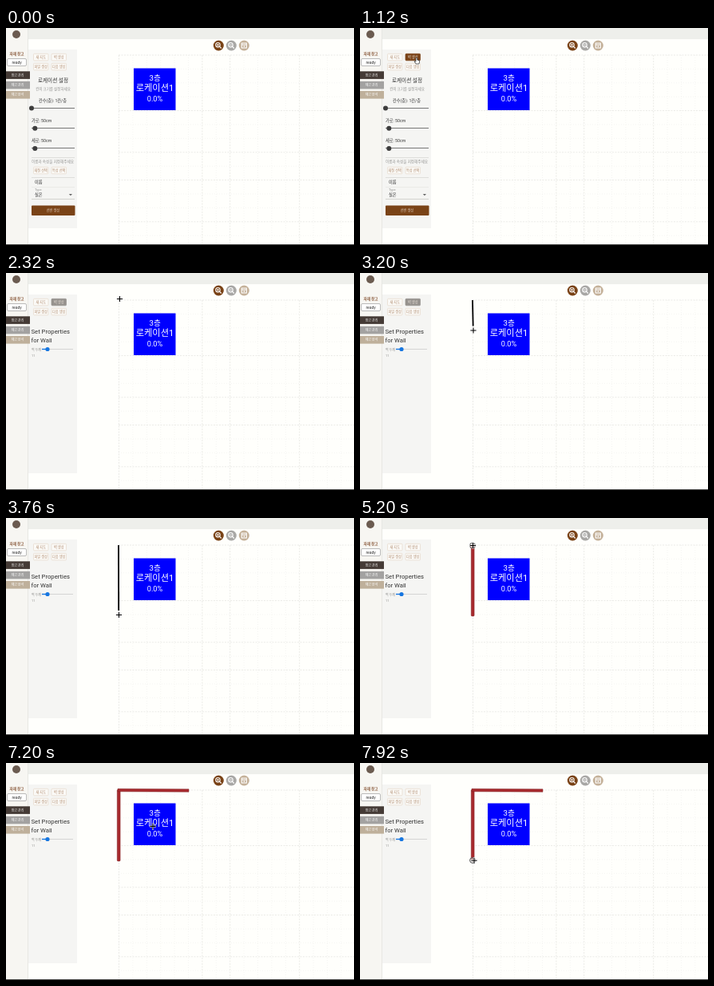
Write an HTML page that moves like this. It is 436 px wide and 272 px high and loops after 8000 ms.

```html
<!DOCTYPE html>
<html lang="ko">
<head>
<meta charset="utf-8">
<style>
html, body { margin: 0; width: 100%; height: 100%; overflow: hidden; background: #fffffc; }
svg { display: block; width: 436px; height: 272px; }
text { font-family: Roboto, "Noto Sans CJK KR", "Noto Sans CJK", sans-serif; fill: #333; }
.mid { text-anchor: middle; }
.pale { fill: #929290; }
.track { stroke: #777; stroke-width: 1; }
.knob { fill: #3d3d3d; }
.icon { fill: none; stroke: #fff; stroke-width: 1.1; }
.btn rect { fill: #fbfaf7; stroke: #e6d8ca; stroke-width: .7; }
.btn text { fill: #b08c70; font-size: 4.2px; text-anchor: middle; }
.hover rect { fill: #7a4317; stroke: #7a4317; }
.focus rect { fill: #96928e; stroke: #96928e; }
.hover text, .focus text { fill: #e8e0d8; }
.label text { fill: #fff; }
</style>
</head>
<body>
<svg viewBox="0 0 436 272">
  <rect width="436" height="272" fill="#fffffc"/>
  <rect x="28" width="408" height="14" fill="#eeefeb"/>
  <g id="grid" fill="none"></g>

  <rect width="27.5" height="272" fill="#f7f6f2"/>
  <path d="M27.5 0V272" stroke="#dededa" stroke-width=".7"/>
  <circle cx="13" cy="8" r="5" fill="#6b5b50"/>
  <text class="mid" x="13.5" y="33.5" font-size="4.6" font-weight="700" style="fill:#8a5a3c">자재 창고</text>
  <rect x="1.5" y="38.5" width="24" height="9" rx="1.5" fill="#fff" stroke="#aaa" stroke-width=".8"/>
  <text class="mid" x="13.5" y="44.7" font-size="5">ready</text>

  <rect x="28" y="27" width="61" height="224" fill="#f5f5f3"/>
  <g id="menu"></g>
  <g id="buttons"></g>

  <g id="shelfPanel">
    <text class="mid" x="59" y="68.3" font-size="6.6">로케이션 설정</text>
    <text class="mid pale" x="59" y="78.3" font-size="4.5">칸의 크기를 설정하세요</text>
    <text class="mid" x="58.5" y="92.8" font-size="5.2">칸수(층): 1칸/층</text>
    <text x="32" y="117.8" font-size="5.2">가로: 50cm</text>
    <text x="32" y="143" font-size="5.2">세로: 50cm</text>
    <path class="track" d="M32 100.5H86M32 125.5H86M32 150.5H86"/>
    <circle class="knob" cx="32" cy="100.5" r="3"/>
    <circle class="knob" cx="36.3" cy="125.8" r="3"/>
    <circle class="knob" cx="36.3" cy="151" r="3"/>
    <path d="M32 162.5H86M32 187.5H86" stroke="#d9d9d6" stroke-width=".8"/>
    <text class="pale" x="32" y="169.3" font-size="4.6">이름과 속성을 지정해주세요</text>
    <text x="36" y="194.6" font-size="5.2">이름</text>
    <path d="M32 199.5H86" stroke="#e6e6e3" stroke-width=".7"/>
    <text class="pale" x="36" y="204.3" font-size="4">Type</text>
    <text x="36" y="211" font-size="5.2">실온</text>
    <path d="M78.8 208H83L80.9 210.2Z" fill="#666"/>
    <path d="M32 214.5H86" stroke="#c4c4c1" stroke-width=".7"/>
    <rect x="32" y="222.5" width="54.5" height="12.5" rx="1" fill="#7a4317"/>
    <text class="mid" x="59" y="230.3" font-size="4.2" style="fill:#e2d0c0">선반 생성</text>
  </g>

  <g id="wallPanel">
    <text x="31.5" y="75.6" font-size="7.7">Set Properties</text>
    <text x="31.5" y="86.5" font-size="7.7">for Wall</text>
    <text class="pale" x="32" y="97.8" font-size="4">벽 두께</text>
    <path d="M45 95.5H84" stroke="#d4d4d4" stroke-width="1.2"/>
    <path d="M45 95.5H52" stroke="#1676e0" stroke-width="1.4"/>
    <circle cx="52" cy="95.5" r="2.6" fill="#1676e0"/>
    <text class="pale" x="32" y="105" font-size="4">11</text>
  </g>

  <circle cx="266.3" cy="22" r="6.5" fill="#7a4317"/>
  <circle cx="282.3" cy="22" r="6.5" fill="#a9a8a6"/>
  <circle cx="298.3" cy="22" r="6.5" fill="#c4b199"/>
  <g class="icon">
    <path d="M267.4 23.1L269.8 25.5M264.3 21.2h2.4M265.5 20v2.4"/><circle cx="265.5" cy="21.2" r="2.7"/>
    <path d="M283.4 23.1L285.8 25.5M280.3 21.2h2.4"/><circle cx="281.5" cy="21.2" r="2.7"/>
    <path d="M295.3 19h6v6h-6zM295.3 21h6M298.3 22v2"/>
  </g>

  <rect x="160" y="50.5" width="52.5" height="52.5" fill="#00f"/>
  <g class="mid label">
    <text x="186.7" y="66" font-size="9.6">3층</text>
    <text x="186.5" y="79.3" font-size="11.2">로케이션1</text>
    <text x="186.5" y="92.2" font-size="9.2">0.0%</text>
  </g>

  <g fill="#a82a2e" stroke="#7d2023" stroke-width=".5">
    <rect id="wallA" x="139.3" y="33.5" width="3.8" height="89.5" rx="1"/>
    <path id="wallB" d="M140 32.3L229 32.8V36.2L140 35.8Z"/>
  </g>
  <path id="draft" stroke="#000" stroke-width="1.8"/>
  <circle id="snap" r="3.4" fill="#ddd" fill-opacity=".6" stroke="#555" stroke-width="1"/>
  <g id="cross" fill="none">
    <path d="M-4 0H4M0-4V4" stroke="#fff" stroke-width="2"/>
    <path d="M-3.6 0H3.6M0-3.6V3.6" stroke="#000" stroke-width="1.1"/>
  </g>
  <path id="hand" d="M-1-3.5Q0-4.3.8-3.5V-1L3.4-.3Q4 2 2.8 4H-.8L-3 .8L-1 1Z" fill="#fff" stroke="#222" stroke-width=".7"/>
  <path d="M0 271.5H436" stroke="#4a4a48"/>
</svg>
<script>
const $ = id => document.getElementById(id);
const LOOP = 8000, ORIGIN = { x: 141.5, y: 34 };

function buildGrid() {
  const step = 17.4;
  let out = "";
  const line = (d, strong) => {
    const look = strong ? 'stroke="#dcdcd8" stroke-dasharray="2 1.5"' : 'stroke="#efefeb" stroke-dasharray="1 2"';
    out += `<path d="${d}" stroke-width=".6" ${look}/>`;
  };
  for (let k = 0; k < 17; k++) line(`M${ORIGIN.x + k * step} 34V271`, [0, 6, 8, 13].includes(k));
  for (let k = 0; k < 14; k++) line(`M141 ${ORIGIN.y + k * step}H436`, [0, 4, 7, 9, 12].includes(k));
  $("grid").innerHTML = out;
}

const button = (x, y, label, id = "") =>
  `<g class="btn" id="${id}"><rect x="${x}" y="${y}" width="18.5" height="8.5" rx="1"/>` +
  `<text x="${x + 9.2}" y="${y + 5.8}">${label}</text></g>`;

buildGrid();
$("menu").innerHTML = [["#453b36", "창고 관리", 54.3], ["#a3a2a1", "재고 관리", 66.8], ["#bfb09b", "재고 분석", 79]]
  .map(([color, label, y]) => `<rect y="${y}" width="30" height="9.6" fill="${color}"/>` +
    `<text class="mid" x="14.5" y="${y + 6.3}" font-size="4" style="fill:#fff">${label}</text>`).join("");
$("buttons").innerHTML = button(34.5, 32.3, "새 지도") + button(57, 32.3, "벽 생성", "wallButton") +
  button(34.5, 44.3, "파일 생성") + button(57, 44.3, "다음 생성");
$("shelfPanel").innerHTML += button(34.5, 174.3, "재질 선택") + button(57, 174.3, "특성 선택");

// Pointer path: time, x, y
const path = [
  [160, 66, 222], [560, 66, 166], [960, 71, 41], [1440, 71, 41], [1760, 142, 33], [2320, 142.5, 32.5],
  [2800, 141, 33], [3040, 142, 34], [3360, 142, 110], [3760, 141.5, 121.5], [4240, 141.5, 121.5],
  [4560, 151, 95], [4880, 143, 36], [5120, 141.5, 34.5], [5520, 141.5, 34.5], [5760, 198, 35],
  [6160, 225, 35], [6320, 225.5, 35.3], [6640, 227, 35], [6960, 184, 35],
  [7360, 184, 109], [7600, 152, 126], [7760, 142, 122], [7920, 143, 122.3]
];

function pointerAt(t) {
  const i = path.findIndex(p => p[0] > t);
  if (i === 0) return path[0].slice(1);
  if (i < 0) return path[path.length - 1].slice(1);
  const [t0, x0, y0] = path[i - 1], [t1, x1, y1] = path[i];
  const f = (t - t0) / (t1 - t0);
  return [x0 + (x1 - x0) * f, y0 + (y1 - y0) * f];
}

const show = (id, on) => { $(id).style.display = on ? "" : "none"; };

// The screen refreshes four times in every five 80 ms ticks.
function refreshTime(ms) {
  const n = Math.floor((ms % LOOP) / 80);
  return (n % 5 === 3 ? n - 1 : n) * 80;
}

function draw(now) {
  const t = refreshTime(now);
  const during = (a, b) => t >= a && t < b;
  const [x, y] = pointerAt(t);

  show("shelfPanel", t < 1520);
  show("wallPanel", t >= 1520);
  $("wallButton").setAttribute("class",
    "btn" + (during(960, 1520) ? " hover" : during(1520, 3520) ? " focus" : ""));

  show("hand", during(160, 1600));
  show("cross", t >= 1600);
  for (const id of ["hand", "cross"]) $(id).setAttribute("transform", `translate(${x} ${y})`);

  const down = during(3120, 4320), across = during(5600, 6480);
  show("draft", down || across);
  if (down) $("draft").setAttribute("d", `M141 34L${x - .3} ${Math.max(34, y - 5.5)}`);
  if (across) $("draft").setAttribute("d", `M141 34L${Math.max(141, x - 4)} ${y}`);
  show("wallA", t >= 4320);
  show("wallB", t >= 6480);

  const atTop = during(5120, 5600);
  show("snap", atTop || t >= 7760);
  $("snap").setAttribute("transform", `translate(141 ${atTop ? 34.5 : 122})`);
}

function frame() {
  draw(performance.now());
  requestAnimationFrame(frame);
}
frame();
</script>
</body>
</html>
```
